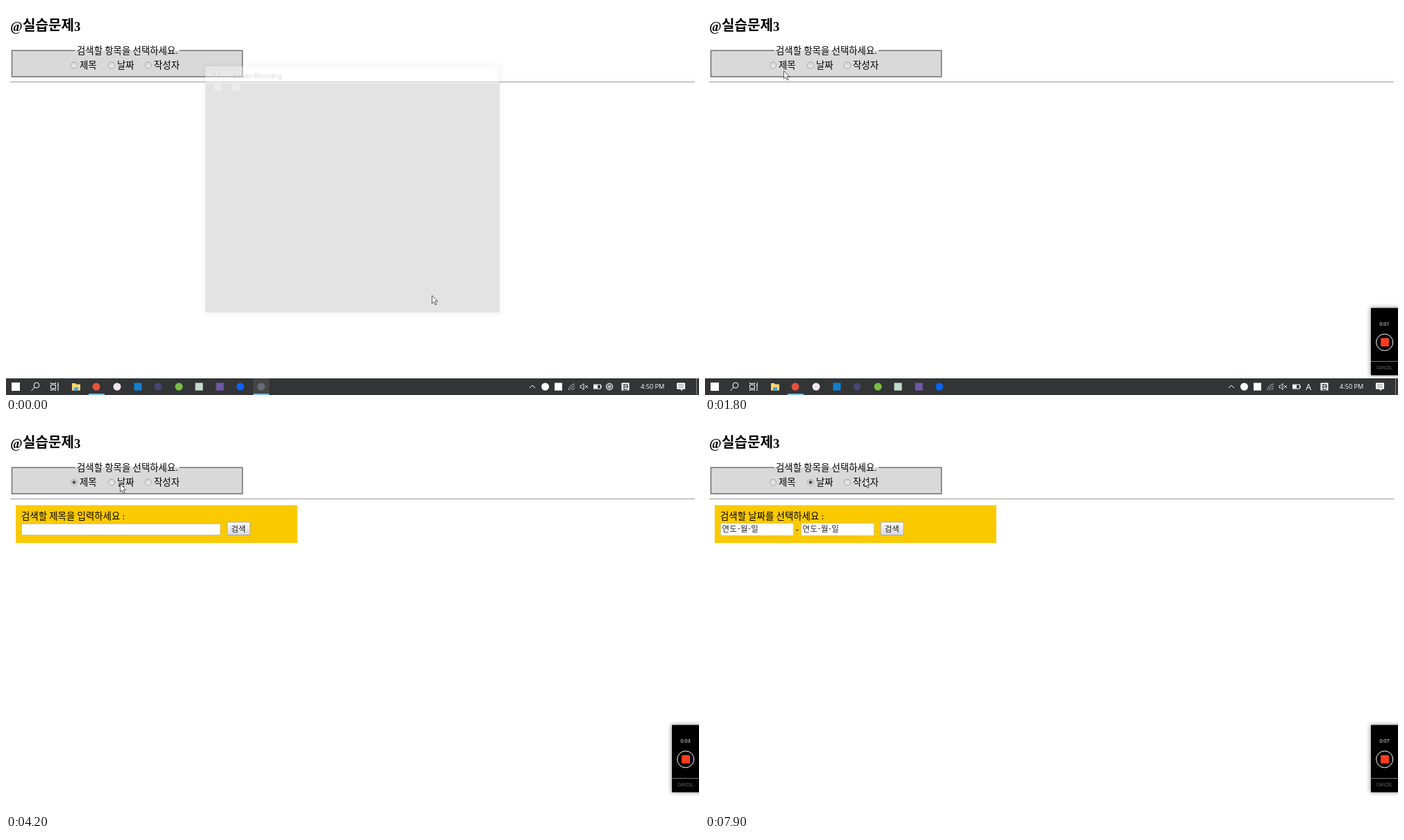
An HTML page for the animation above (8 s loop, 998x561 px).

```html
<!DOCTYPE html>
<html lang="ko">
<head>
<meta charset="utf-8">
<style>
html, body { margin: 0; width: 100%; height: 100%; overflow: hidden; background: #fff; }
svg { display: block; width: 100%; height: 100%; }
text { font: 13.4px "Liberation Serif", "Noto Sans CJK KR", "Noto Sans CJK JP", serif; }
.small { font: 11.4px "Noto Sans CJK KR", "Noto Sans CJK JP", sans-serif; fill: #222; }
.date { letter-spacing: .5px; }
.ui { font: 7.4px "Open Sans", "Noto Sans", sans-serif; fill: #fff; }
.line { fill: none; stroke: #fff; }
.field { fill: #fff; stroke: #d4c48a; }
</style>
</head>
<body>
<svg viewBox="0 0 998 561" preserveAspectRatio="none">
  <defs>
    <linearGradient id="face" x2="0" y2="1">
      <stop stop-color="#fafafa"/><stop offset="1" stop-color="#d9d9d9"/>
    </linearGradient>
    <linearGradient id="dim" x2="0" y2="1">
      <stop stop-color="#d6d6d6"/><stop offset="1" stop-color="#ececec"/>
    </linearGradient>
    <filter id="blur" x="-20%" y="-20%" width="140%" height="140%"><feGaussianBlur stdDeviation="3"/></filter>
    <g id="button">
      <rect x=".5" y=".5" width="33" height="18.5" rx="1" fill="url(#face)" stroke="#a9a9a9"/>
      <text class="small" x="6.3" y="14">검색</text>
    </g>
  </defs>
  <rect width="998" height="561" fill="#fff"/>

  <!-- heading and search options -->
  <g font-weight="bold">
    <text x="6.3" y="36" style="font-size:18.7px;font-weight:bold">@</text>
    <text x="24" y="35.3" style="font-size:20.1px;font-weight:bold">실습문제</text>
    <text x="98" y="36" style="font-size:18.7px;font-weight:bold">3</text>
  </g>
  <rect x="8" y="64" width="333" height="38.5" fill="#d9d9d9"/>
  <path d="M100 64.3H8.5V102H340.5V64.3H250" fill="none" stroke="#707070" stroke-width="1.5"/>
  <text x="102" y="69.2">검색할 항목을 선택하세요.</text>
  <g id="radios"></g>
  <circle id="dot" cy="85.5" r="2.5" fill="#555"/>
  <path d="M6 109.5H992" stroke="#999"/>

  <!-- result forms -->
  <g id="form">
    <rect x="14" y="118.5" width="405.5" height="54.5" fill="#fbc900"/>
    <g id="titleForm">
      <text x="22" y="139.3">검색할 제목을 입력하세요 :</text>
      <rect class="field" x="22.5" y="145.5" width="286" height="16"/>
      <use href="#button" x="318" y="142.5"/>
    </g>
    <g id="dateForm">
      <text x="22" y="139.3">검색할 날짜를 선택하세요 :</text>
      <rect class="field" x="22.5" y="144.5" width="105" height="18"/>
      <rect class="field" x="138.5" y="144.5" width="105" height="18"/>
      <text class="small date" x="24.5" y="157">연도-월-일</text>
      <text class="small date" x="140.5" y="157">연도-월-일</text>
      <text x="130.5" y="157.3">-</text>
      <use href="#button" x="252.5" y="142.5"/>
    </g>
  </g>

  <!-- closing window -->
  <g id="ghost">
    <path d="M287 87H711V442H287Z" fill="none" stroke="#000" stroke-width="6" opacity=".04" filter="url(#blur)"/>
    <rect x="287" y="87" width="423" height="24" fill="#fff" opacity=".4"/>
    <rect x="287" y="111" width="424" height="331" fill="#e3e3e3"/>
    <path d="M300 112h10v10h-10zM325 112h11v10h-11z" fill="#ececec"/>
    <path d="M300 97v3M307 97v3" stroke="#bbb"/>
    <text class="ui" x="328" y="103.5" style="font-size:8.6px;fill:#d2d2d2">Screen Recording</text>
  </g>

  <!-- taskbar -->
  <g id="bar">
    <rect y="537" width="998" height="24" fill="#333435"/>
    <rect x="8" y="543" width="12" height="12" fill="#fff"/>
    <g class="line">
      <circle cx="44" cy="547" r="3.9"/><path d="M41 550L36.500 555"/>
      <path d="M64.500 546.500h7v5h-7zM64.500 543v1.500h7V543M64.500 555v-1.500h7V555M75 543v12M74 547h2"/>
      <path d="M754 551l4-4 4 4"/>
      <path d="M810 554a10 10 0 0 1 9-9M813 554a7 7 0 0 1 6-6M816 554a4 4 0 0 1 3-3" stroke="#bbb"/>
      <path d="M827 547.500h2l3-3v9l-3-3h-2zM834 547l4 4M838 547l-4 4" stroke-width=".9"/>
      <path d="M846.500 546h10v6h-10zM857.500 548v2"/>
    </g>
    <rect x="847" y="546.500" width="5" height="5" fill="#fff"/>
    <path d="M95 544h5l1 1.500h6v9H95z" fill="#f8d775"/><path d="M98 550h6v4.500h-6z" fill="#4ba3dd"/>
    <g id="apps"></g>
    <path d="M119 560h23" stroke="#76b9ed" stroke-width="2"/>
    <g id="recorderApp">
      <rect x="356" y="537" width="23" height="24" fill="#444"/>
      <circle cx="367.500" cy="549" r="5.500" fill="#656b78"/>
      <path d="M356 560h23" stroke="#76b9ed" stroke-width="2"/>
    </g>
    <g id="offline" class="line" stroke-width=".9">
      <circle cx="869" cy="549" r="4.800" style="fill:#777"/><path d="M867 547l4 4M871 547l-4 4"/>
    </g>
    <text id="latin" class="ui" x="869" y="553.700" text-anchor="middle" style="font-size:13px">A</text>
    <rect x="886.500" y="543.500" width="11" height="11" fill="#fff"/>
    <text class="small" x="892" y="552.700" text-anchor="middle" style="font-size:9.500px;font-weight:bold">한</text>
    <text class="ui" x="914" y="552.300" style="font-size:9.200px">4:50 PM</text>
    <path d="M966 543.500h12v9h-4v3l-3-3h-5z" fill="#fff"/>
    <path d="M968 546.500h8M968 549.500h8" stroke="#555" stroke-width=".8"/>
    <path d="M994.500 537v24" stroke="#888"/>
  </g>
  <path id="edge" d="M0 560.500H998" stroke="#333"/>

  <!-- recorder -->
  <g id="recorder">
    <rect x="958" y="435" width="44" height="98" opacity=".4" filter="url(#blur)"/>
    <rect x="959" y="435.500" width="39" height="97"/>
    <text id="timer" class="ui" x="978.500" y="460.500" text-anchor="middle"></text>
    <circle class="line" cx="978.700" cy="485" r="12"/>
    <rect x="973" y="479" width="12" height="12" rx="1.500" fill="#ff3c22"/>
    <path d="M959 512.500h39" stroke="#777"/>
    <text class="ui" x="978.500" y="523.700" text-anchor="middle" style="font-size:6.200px;fill:#777">CANCEL</text>
  </g>

  <path id="cursor" d="M.5.500V12L3.200 9.500 5.200 14 7 13.200 5.100 8.800H8.800Z" fill="#fff" stroke="#333" stroke-width=".8"/>
</svg>
<script>
const $ = id => document.getElementById(id);
const show = (id, on) => $(id).style.display = on ? '' : 'none';

$('radios').innerHTML = [[98, '제목'], [152, '날짜'], [205, '작성자']].map(([x, label]) =>
  `<circle cx="${x}" cy="85.5" r="4.6" fill="url(#dim)" stroke="#a6a6a6"/>
   <text x="${x + 8}" y="90">${label}</text>`).join('');

// plain marks: centre x, colour, round or square
$('apps').innerHTML = [
  [130, '#e5513f', 1], [160, '#f2e6f3', 1], [190, '#1180cc', 0], [219, '#4a4477', 1], [249, '#78bd45', 1],
  [278, '#c3dccb', 0], [308, '#7058a5', 0], [337.5, '#0b63f3', 1], [776.5, '#fff', 1], [795.5, '#fff', 0]
].map(([x, fill, round]) =>
  `<rect x="${x - 5.5}" y="543.5" width="11" height="11" rx="${round ? 5.5 : 0}" fill="${fill}"/>`).join('');

// pointer stops: time, x, y
const stops = [
  [0, 613, 417], [100, 613, 417], [800, 245, 263], [1600, 113, 93], [1800, 113, 93], [2700, 109, 86],
  [3200, 111, 80.5], [3600, 111, 80.5], [4200, 164, 87.5], [4700, 165, 84], [5900, 217, 96],
  [6900, 227, 84], [7900, 229, 80]
];

function pointer(t) {
  const i = Math.max(1, stops.findIndex(s => s[0] >= t));
  const [t0, x0, y0] = stops[i - 1], [t1, x1, y1] = stops[i];
  const p = (t - t0) / (t1 - t0), e = p * p * (3 - 2 * p);
  return [x0 + (x1 - x0) * e, y0 + (y1 - y0) * e];
}

function draw(now) {
  const t = Math.floor(now % 8000 / 100) * 100;
  const recording = t >= 400, titled = t >= 3600, dated = t >= 4700;
  const seconds = Math.max(0, Math.floor((t - 500) / 1000));
  show('ghost', t < 100);
  show('recorderApp', t < 300);
  show('offline', !recording);
  show('latin', recording);
  show('recorder', recording);
  show('bar', t < 3400);
  show('edge', t === 3400);
  show('form', titled);
  show('dot', titled);
  show('titleForm', !dated);
  show('dateForm', dated);
  $('dot').setAttribute('cx', dated ? 152 : 98);
  $('timer').textContent = seconds ? '0:0' + seconds : '00:00';
  $('cursor').setAttribute('transform', `translate(${pointer(t)})`);
}

const start = performance.now();
function tick() {
  draw(performance.now() - start);
  requestAnimationFrame(tick);
}
tick();
</script>
</body>
</html>
```
